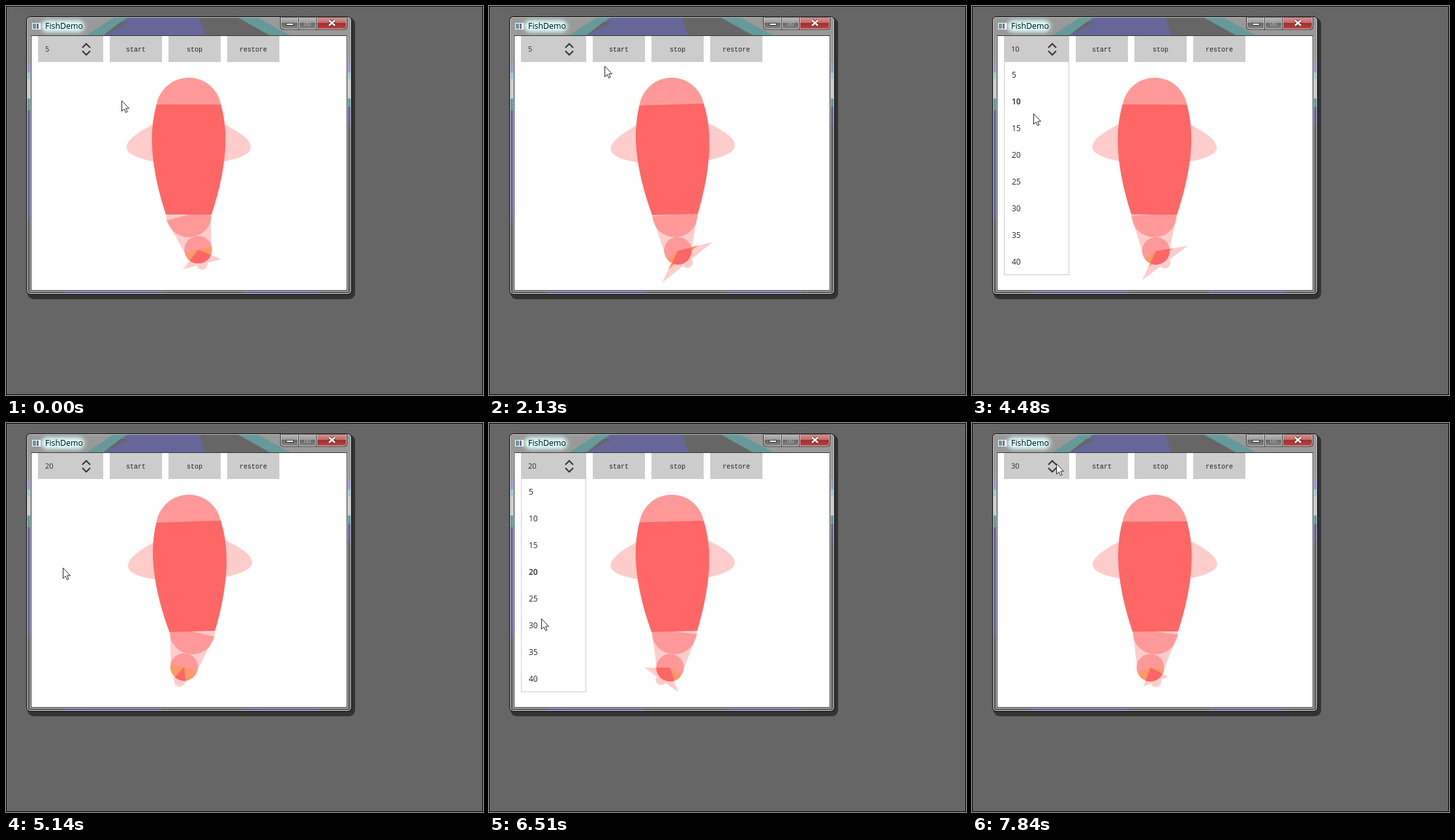
These frames come from a looping animation (731x597 px, 8 s). An HTML page with a canvas:

```html
<!DOCTYPE html>
<html lang="en">
<head>
<meta charset="utf-8">
<title>FishDemo</title>
<style>
  html, body { margin: 0; width: 100%; height: 100%; overflow: hidden; background: #666; }
  svg, canvas { position: absolute; left: 0; top: 0; display: block; }
  .ui { font: 12px "Open Sans", "Noto Sans", sans-serif; fill: #262626; }
  .title { font-size: 12.4px; fill: #000; }
  .mono { font: 10px "Liberation Mono", monospace; text-anchor: middle; fill: #222; }
</style>
</head>
<body>
<svg width="731" height="597" viewBox="0 0 731 597">
  <defs>
    <filter id="glow" x="-30%" y="-80%" width="160%" height="260%"><feGaussianBlur stdDeviation="3"/></filter>
    <linearGradient id="red" x2="0" y2="1">
      <stop offset="0" stop-color="#c99"/><stop offset=".45" stop-color="#c66"/>
      <stop offset=".5" stop-color="#933"/><stop offset="1" stop-color="#c63f3f"/>
    </linearGradient>
    <linearGradient id="glass" x2="0" y2="1">
      <stop offset="0" stop-color="#bbb"/><stop offset=".45" stop-color="#999"/>
      <stop offset=".5" stop-color="#666"/><stop offset="1" stop-color="#888"/>
    </linearGradient>
    <clipPath id="frame"><rect x="32" y="17" width="497" height="425" rx="5"/></clipPath>
  </defs>
  <rect x=".5" y=".5" width="730" height="596" fill="#666" stroke="#000"/>
  <rect x="33" y="18" width="502" height="432" rx="9" fill="#333"/>

  <g clip-path="url(#frame)">
    <path fill="#666" d="M32 17h497v425h-497z"/>
    <path fill="#999" d="M32 17h497v69h-497z"/>
    <path fill="#699" d="M122 46L166 17H384L437 46z"/>
    <path fill="#669" d="M149 46L187 17H350L404 46z"/>
    <path fill="#666" d="M296 17h58l52 29H306zM148 46l28-22 12 2-14 6z"/>
    <path fill="#99c" d="M32 86h7v16h-7zM522 86h7v16h-7z"/>
    <path fill="#9cc" d="M32 102h7v10h-7zM522 102h7v10h-7z"/>
    <path fill="#ccc" d="M32 112h7v30h-7zM522 112h7v30h-7z"/>
    <path fill="#699" d="M32 142h7v18h-7zM522 142h7v13h-7z"/>
    <path fill="#669" d="M32 160h7v160l-7 14zM522 155h7v27h-7zM90 436h150v6H90zM365 436h115v6H365z"/>
  </g>
  <rect x="31.5" y="16.5" width="498" height="426" rx="6" fill="none" stroke="#000"/>
  <rect x="32.5" y="17.5" width="496" height="424" rx="5" fill="none" stroke="#ccc"/>
  <rect x="38.5" y="45.5" width="484" height="391" fill="#fff" stroke="#333"/>
  <path d="M37.5 45V437.5H523.5V45" fill="none" stroke="#ccc"/>

  <path d="M39.500 25.500h14v11h-14z" fill="#fff" stroke="#999"/>
  <path d="M41 27h5v8h-5z" fill="#699"/><path d="M47 27h3v8h-3z" fill="#669"/>
  <rect x="54" y="22" width="66" height="18" rx="9" fill="#dff" filter="url(#glow)"/>
  <text class="ui title" x="60" y="35">FishDemo</text>

  <g stroke="#333">
    <path fill="url(#glass)" d="M420.500 17v15q0 4 4 4H448.500V17zM448.500 17v19h27v-19z"/>
    <path fill="url(#red)" d="M475.500 17v19h43q4 0 4-4V17z"/>
  </g>
  <path d="M421.500 17v14q0 4 4 4h22v-18M449.500 17v18h25v-18M476.500 17v18h41q4 0 4-4v-14" fill="none" stroke="#ccc"/>
  <rect x="429.500" y="26.500" width="11" height="3" fill="#fff" stroke="#333"/>
  <path d="M457.500 22.500h9v7h-9zM460.500 25.500h3v2h-3z" fill="none" stroke="#aaa"/>
  <path d="M495 22l9 8M504 22l-9 8" stroke="#533" stroke-width="4.500"/>
  <path d="M495 22l9 8M504 22l-9 8" stroke="#fff" stroke-width="2.500"/>

  <path fill="#ccc" d="M49 46h100v40H49zM159 46h80v40h-80zM249 46h80v40h-80zM339 46h80v40h-80z"/>
  <text class="mono" x="199" y="70">start</text>
  <text class="mono" x="289" y="70">stop</text>
  <text class="mono" x="379" y="70">restore</text>
  <text class="ui" id="value" x="60" y="70" style="font-size:11px">5</text>
  <path d="M117 64l6-6 6 6M117 69l6 6 6-6" fill="none" stroke="#333" stroke-width="2"/>
  <g id="popup" class="ui"><rect x="49.500" y="85.500" width="99" height="327" fill="#fff" stroke="#ccc"/></g>
</svg>
<canvas id="stage" width="731" height="597"></canvas>

<script>
const LOOP = 8000;
const WHITE = '#fff', PALE = '#fcc', PINK = '#f99', RED = '#f66', ORANGE = '#f96';
const ctx = document.getElementById('stage').getContext('2d');
const popup = document.getElementById('popup');
const valueText = document.getElementById('value');

// Screen updates: time, pointer x, pointer y
const updates = [
  [0, 177, 145], [100, 186, 117], [440, 163, 79], [760, 130, 68], [1100, 124, 76],
  [1440, 196, 72], [1790, 196, 72], [2130, 177, 92], [2470, 168, 106], [2790, 131, 82],
  [3140, 106, 112], [3460, 83, 139], [3810, 122, 112], [4130, 120, 73], [4480, 94, 165],
  [4830, 87, 222], [5140, 87, 222], [5480, 112, 88], [5830, 123, 71], [6170, 100, 200],
  [6510, 80, 300], [6830, 79, 315], [7180, 79, 315], [7500, 132, 180], [7840, 129, 62]
];
// Swim phase over time; the fish rests until the first key
const swimKeys = [
  [1790, 16], [2130, 53], [3460, 177], [4480, 292], [5140, 365],
  [5830, 500], [6510, 638], [6830, 740], [7500, 920], [7840, 1042]
];
const openSpans = [[1100, 1790], [3140, 3810], [4480, 5140], [5830, 6830]];
const choices = [[0, 5], [3810, 10], [5140, 20], [6830, 30]];

const rows = Array.from({ length: 8 }, (_, i) => {
  const row = document.createElementNS('http://www.w3.org/2000/svg', 'text');
  row.setAttribute('x', 61);
  row.setAttribute('y', 110 + 41 * i);
  row.textContent = 5 * (i + 1);
  return popup.appendChild(row);
});

const lastBefore = (list, t) => list.filter(item => item[0] <= t).pop();
const rad = deg => deg * Math.PI / 180;
const sin = deg => Math.sin(rad(deg));
const cos = deg => Math.cos(rad(deg));

function swimPhase(t) {
  if (t < swimKeys[0][0]) return 0;
  const i = swimKeys.findIndex(key => key[0] > t);
  if (i < 0) return swimKeys[swimKeys.length - 1][1];
  const [t0, v0] = swimKeys[i - 1], [t1, v1] = swimKeys[i];
  return v0 + (v1 - v0) * (t - t0) / (t1 - t0);
}

// Angles are measured from straight down, positive towards the right
const polar = ([x, y], length, angle) => [x + length * sin(angle), y + length * cos(angle)];

function circle(center, radius) {
  const path = new Path2D();
  path.arc(...center, radius, 0, 2 * Math.PI);
  return path;
}

function polygon(...points) {
  const path = new Path2D();
  points.forEach(p => path.lineTo(...p));
  path.closePath();
  return path;
}

function trapezoid(a, ra, b, rb, angle) {
  return polygon(polar(a, ra, angle - 90), polar(a, ra, angle + 90),
                 polar(b, rb, angle + 90), polar(b, rb, angle - 90));
}

function tailFin(apex, length, half, angle) {
  const base = polar(apex, length, angle);
  return polygon(apex, polar(base, half, angle - 90), polar(base, half, angle + 90));
}

function fill(path, color, ...clips) {
  ctx.save();
  clips.forEach(clip => ctx.clip(clip));
  ctx.fillStyle = color;
  ctx.fill(path);
  ctx.restore();
}

function drawSideFin(head, tilt, side) {
  const start = polar(head, 45, tilt + side * 70);
  const path = new Path2D();
  path.moveTo(...start);
  path.quadraticCurveTo(...polar(start, 117, tilt + side * 65), ...polar(start, 65, tilt));
  fill(path, PALE);
}

function drawFish(phase) {
  const head = [280, 160];
  const tilt = 2 * sin(1.2 * phase);
  const hip = polar(head, 160, tilt);
  const hipAngle = tilt + 15 * cos(1.5 * phase);
  const joint = polar(hip, 56, hipAngle);
  const tailAngle = hipAngle + 35 * sin(1.5 * phase);
  const tip = polar(joint, 23, tailAngle);
  const spread = 30 + 20 * sin(1.7 * phase);

  drawSideFin(head, tilt, -1);
  drawSideFin(head, tilt, 1);
  fill(circle(head, 50), PINK);

  const hipCircle = circle(hip, 35), jointCircle = circle(joint, 21);
  const upperTail = trapezoid(hip, 35, joint, 21, hipAngle);
  const lowerTail = trapezoid(joint, 21, tip, 8.4, tailAngle);
  const outerFin = tailFin(joint, 23, spread, tailAngle);
  const innerFin = tailFin(joint, 13, Math.abs(spread - 20), tailAngle);

  fill(hipCircle, PALE);
  fill(upperTail, PALE);
  fill(hipCircle, PINK, upperTail);
  fill(circle(tip, 8.4), PALE);
  fill(lowerTail, PALE);
  fill(outerFin, PALE);
  fill(innerFin, ORANGE);
  fill(jointCircle, PINK);
  fill(trapezoid(joint, 21, polar(joint, 21, tailAngle), 21, tailAngle), ORANGE, jointCircle);
  fill(upperTail, PINK, jointCircle);
  fill(outerFin, RED, jointCircle);

  const body = new Path2D();
  body.moveTo(...polar(head, 50, tilt - 100));
  body.quadraticCurveTo(...polar(head, 89.6, tilt - 50), ...polar(hip, 35, tilt - 90));
  body.lineTo(...polar(hip, 35, tilt + 90));
  body.quadraticCurveTo(...polar(head, 89.6, tilt + 50), ...polar(head, 50, tilt + 100));
  fill(body, RED);
}

function drawPointer(x, y) {
  ctx.save();
  ctx.translate(x + 0.5, y + 0.5);
  const arrow = new Path2D('M0 0V16L3.7 12.500L6 18L8.500 17L6.200 11.600H11z');
  fill(arrow, WHITE);
  ctx.strokeStyle = '#223';
  ctx.stroke(arrow);
  ctx.restore();
}

let shown = -1;

function render() {
  const now = performance.now() % LOOP;
  const [t, x, y] = lastBefore(updates, now);
  if (t !== shown) {
    shown = t;
    const value = lastBefore(choices, t)[1];
    valueText.textContent = value;
    popup.style.display = openSpans.some(([a, b]) => t >= a && t < b) ? '' : 'none';
    rows.forEach((row, i) => { row.style.fontWeight = 5 * (i + 1) === value ? 600 : 400; });
    ctx.clearRect(0, 0, 731, 597);
    drawFish(swimPhase(t));
    drawPointer(x, y);
  }
  requestAnimationFrame(render);
}
render();
</script>
</body>
</html>
```
